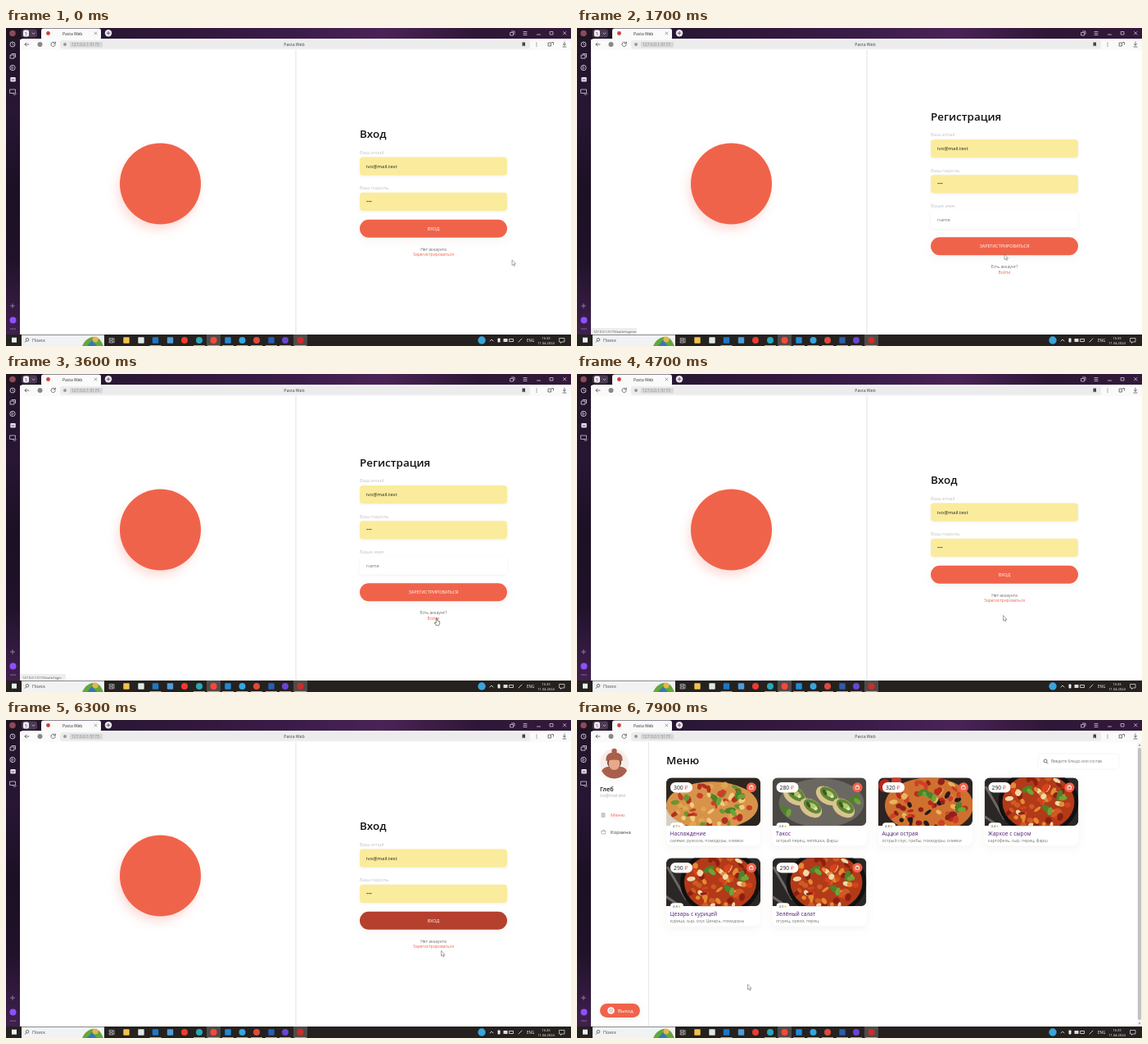
Write an HTML page that moves like this. It is 690x388 px and loops after 8000 ms.

```html
<!DOCTYPE html>
<html lang="ru">
<head>
<meta charset="utf-8">
<title>Pasta Web</title>
<style>
html, body { margin: 0; width: 100%; height: 100%; overflow: hidden; background: #fff; }
svg { display: block; width: 100%; height: 100%; }
text { font-family: 'Open Sans', 'Noto Sans', sans-serif; white-space: pre; }
</style>
</head>
<body>
<svg id="stage" viewBox="0 0 690 388"></svg>
<script>
const RED = '#f0634b', MAIL = 'ivo@mail.test', APP = 'Pasta Web';
const LOOP = 8000, STEP = 100;

// Markup helpers
const text = (x, y, size, fill, str, extra = '') =>
  `<text x="${x}" y="${y}" font-size="${size}" fill="${fill}" ${extra}>${str}</text>`;
const mid = 'text-anchor="middle"';
const box = (x, y, w, h, fill, r = 0, extra = '') =>
  `<rect x="${x}" y="${y}" width="${w}" height="${h}" rx="${r}" fill="${fill}" ${extra}/>`;
const dot = (x, y, r, fill, extra = '') => `<circle cx="${x}" cy="${y}" r="${r}" fill="${fill}" ${extra}/>`;
const oval = (x, y, rx, ry, fill, turn = 0) =>
  `<ellipse rx="${rx}" ry="${ry}" fill="${fill}" transform="translate(${x} ${y}) rotate(${turn})"/>`;
const line = (d, color, w = 0.8) =>
  `<path d="${d}" fill="none" stroke="${color}" stroke-width="${w}" stroke-linecap="round" stroke-linejoin="round"/>`;
const group = (id, body) => `<g id="${id}">${body}</g>`;

function defs() {
  const grad = (id, dir, ...stops) => `<linearGradient id="${id}" ${dir}>` + stops.map((c, i) =>
    `<stop offset="${i / (stops.length - 1)}" stop-color="${c}"/>`).join('') + '</linearGradient>';
  const shadow = (id, dx, dy, blur, color, alpha) =>
    `<filter id="${id}" x="-50%" y="-50%" width="200%" height="220%"><feDropShadow dx="${dx}" dy="${dy}"
      stdDeviation="${blur}" flood-color="${color}" flood-opacity="${alpha}"/></filter>`;
  return '<defs>' +
    grad('top', '', '#20141f', '#281733', '#32183c', '#3a1c48', '#4a2356', '#2e1736', '#33193b') +
    grad('side', 'x2="0" y2="1"', '#22152a', '#281634', '#1b1024', '#201229', '#40204f') +
    shadow('glow', -3, 7, 6, RED, 0.2) + shadow('soft', 0, 3, 5, '#a08c70', 0.1) +
    shadow('field', 0, 1, 1.4, '#8888aa', 0.13) +
    '<clipPath id="photo"><path d="M0 59V7a7 7 0 0 1 7-7H108a7 7 0 0 1 7 7V52a7 7 0 0 1-7 7z"/></clipPath></defs>';
}

function browser() {
  const white = '#e6dfe9', grey = '#555';
  const strip = box(0, 0, 690, 14, 'url(#top)') + box(0, 13, 17, 361, 'url(#side)') +
    dot(8, 6.5, 3.8, '#8a4a5c') + box(19, 1.5, 19, 10, '#4d3b56', 3) + box(21, 2.5, 7, 8, '#f4f0f5', 2) +
    text(24.5, 8.5, 5, '#333', '5', mid) + line('M32 6l1.5 1.5L35 6', white, 0.7) +
    box(43, 0.5, 73, 14, '#fafafa', 3) + dot(51.5, 6.5, 2.4, '#cf3f3a') + text(69, 8.5, 5, '#333', APP) +
    line('M108 5l3 3m0-3l-3 3', '#666', 0.6) +
    dot(125, 6.3, 4.2, '#efe8f2') + line('M123 6.3h4m-2-2v4', '#333', 0.7) +
    line('M616 5.500h3.500v3.500h-3.500zM617.500 4h3.500v3.500M632 4.500h4M632 6.500h4M632 8.500h4M648.500 8h4M664.500 4.500h3.500v3.500h-3.500zM680.500 4.500l3.500 3.500m0-3.500l-3.500 3.500', white, 0.7);
  const rail = dot(8, 20, 3, 'none', `stroke="${white}" stroke-width=".8"`) + line('M8 18v2l1.500 1', white, 0.6) +
    line('M5.500 33h4.500v4h-4.500zM7 31.500h4.500v4', white) +
    dot(8, 48.5, 3.2, 'none', `stroke="${white}" stroke-width=".8"`) + line('M7.300 47l2 1.500-2 1.500z', white, 0.6) +
    box(5.3, 60, 6.5, 5.5, white, 1) + line('M7 63h3', '#2a1634', 0.7) +
    line('M5 75h6.500v4.500h-6.500zM8.500 80l2 2 2-2', white, 0.7) +
    line('M5.500 339h5m-2.500-2.500v5', '#a58fb0') + dot(8.5, 356.5, 4, '#8d50ff') +
    [6, 8.5, 11].map(x => dot(x, 367, 0.6, white)).join('');
  const bar = '<path d="M17 27V17a4 4 0 0 1 4-4H690V27z" fill="#fafafa"/>' +
    box(66, 15, 574, 10.5, '#ececed', 3) +
    line('M28 20h-5m2-2l-2 2 2 2', grey) + dot(41.5, 20, 3, '#888') +
    line('M60 18.500a2.700 2.700 0 1 0 .3 2M60.300 17v2h-2', grey) +
    dot(72, 20, 2, '#999') + box(78, 17, 40, 6.5, '#d8d8da', 1) +
    text(80, 22, 5, '#8b8b8d', '127.0.0.1:5173') + text(352, 22, 5.2, '#444', APP, mid) +
    '<path d="M630.500 17.500h3.500v5l-1.750-1.300-1.750 1.300z" fill="#444"/>' +
    [18, 20, 22].map(y => dot(648, y, 0.6, grey)).join('') +
    line('M662.500 18h3v4h-3zM666.500 17.500h2v2.500M682 17v4m-1.700-1.500l1.700 1.700 1.700-1.700M680 23h4', grey);
  return strip + box(17, 27, 673, 347, '#fff') + bar + rail;
}

function taskbar() {
  const icons = [[147, '#f2c24b'], [165, '#dfe8e4'], [182.5, '#1b78c8'], [200.5, '#4f9bd8'], [218, '#ef3a2d', 1],
    [236, '#2aa6b8', 1], [253.5, '#f5483a', 1], [271, '#2489d6'], [288.5, '#35a6de', 1], [306, '#e04a3a', 1],
    [324, '#2a5db0'], [341, '#6a45d4', 1], [359.5, '#c92f2a', 1]];
  const marks = icons.map(([x, c, round], i) =>
    (i == 6 || i == 12 ? box(x - 8.5, 374, 17, 14, '#504b4a') : '') +
    (round ? dot(x, 381, 4, c) : box(x - 3.7, 377.3, 7.4, 7.4, c, 0.8)) +
    (i > 4 || i == 2 ? box(x - 7, 387, 14, 1, '#7fb7e6') : '')).join('');
  return box(0, 374, 690, 14, '#24211f') + box(10 - 3, 377.7, 6, 6, '#e9eef2') +
    box(19, 374.5, 101, 13.5, '#f1f2f3') + dot(26, 380.3, 1.8, 'none', 'stroke="#444" stroke-width=".7"') +
    line('M24.700 381.700l-1.500 1.700', '#444', 0.7) + text(32, 383, 5.4, '#444', 'Поиск') +
    '<path d="M93 388q4-9 12-11 9-2 14 11z" fill="#62a83d"/>' + dot(109, 380, 3.5, '#e6b64c') +
    '<path d="M99 388l6-7 6 7z" fill="#3479b6"/>' +
    line('M126.500 378.500h4v2h-4zM126.500 382h4v2h-4zM132 378.500v5.500', '#ddd', 0.7) + marks +
    dot(581, 381, 4.7, '#3aa4dc') + line('M591 382l2-2 2 2', '#eee') + box(600.5, 378.5, 3, 5, '#eee', 0.8) +
    box(607.5, 379, 5, 4, '#ddd', 0.5) + line('M615 382.500h4.500v-3h-4.500zM626 383l4-4', '#eee') +
    text(636, 383, 4.5, '#fff', 'ENG') + text(659.5, 379.7, 4, '#fff', '16:33', mid) +
    text(659.5, 386.3, 4, '#fff', '11.04.2024', mid) + line('M676 378.500h6v4.500h-3l-1.500 1.500v-1.500h-1.500z', '#eee', 0.7);
}

function form(top, title, named, action, ask, link, id) {
  const field = (y, label, value, fill, ink) => text(432, y - 3.8, 6, '#c2c2c6', label) +
    box(432, y, 180, 22.2, fill, 4, 'filter="url(#field)"') + text(440, y + 13, 6, ink, value);
  const end = top + (named ? 147.8 : 104.8);
  return text(432, top + 5, 13.4, '#111', title, 'font-weight="600"') +
    field(top + 28.6, 'Ваш email', MAIL, '#faec9c', '#222') +
    field(top + 71.8, 'Ваш пароль', '•••', '#faec9c', '#111') +
    (named ? field(top + 115, 'Ваше имя', 'name', '#fff', '#777') : '') +
    box(432, end, 180, 22, RED, 11, `id="${id}" filter="url(#soft)"`) +
    text(522, end + 13, 5.4, '#fff', action, mid) +
    text(522, end + 37.9, 5, '#666', ask, mid) + text(522, end + 44.5, 5, RED, link, mid);
}

// Food pictures: table colour, dish colour, dish [x, y, rx, ry], colours of the bits, leaf spots
const LEAF = '#4f8128';
const foods = {
  pizza: ['#2b2520', '#d8934a', [56, 34, 56, 29], ['#c8402a', '#6d9430', '#efcd7c', '#b0301f', '#e0a650'],
    [[12, 12], [60, 26], [88, 20], [78, 40]]],
  taco: ['#4a4641', '#6b6861', [60, 31, 52, 30], [], [[100, 26], [16, 40]]],
  hot: ['#2c2422', '#d0702f', [62, 34, 54, 34], ['#b82a1e', '#e9b45c', '#231b1c', '#cf3f28', '#8f2118'],
    [[54, 18], [64, 22], [98, 36]]],
  stew: ['#2b2727', '#b23a18', [66, 30, 44, 35], ['#d4431c', '#f2d8a8', '#e58a32', '#8c1f10', '#cf5a22'],
    [[52, 14], [76, 38], [92, 22]]]
};
function photo(kind) {
  const [table, base, [x, y, rx, ry], bits, leaves] = foods[kind];
  let seed = 11;
  const rnd = () => (seed = seed * 16807 % 2147483647) / 2147483647;
  let art = box(0, 0, 115, 59, table);
  if (kind == 'stew') art += line('M2 12L24 50M-2 46L16 58', '#6d6763', 3) + oval(x, y, rx + 5, ry + 5, '#121010');
  if (kind == 'pizza') art += '<path d="M0 59V38l14 5 10 16z" fill="#d8cfc4"/>';
  if (kind == 'hot') art += dot(8, 10, 8, '#b5271d') + dot(22, 4, 6, '#cf3a28');
  art += oval(x, y, rx, ry, base);
  for (let i = 0; i < bits.length * 14; i++) {
    const a = rnd() * 6.283, d = Math.sqrt(rnd()) * 0.92;
    art += oval((x + Math.cos(a) * d * rx).toFixed(1), (y + Math.sin(a) * d * ry).toFixed(1),
      (2.2 + rnd() * 3).toFixed(1), (1.6 + rnd() * 2.4).toFixed(1), bits[i % bits.length], Math.round(rnd() * 180));
  }
  if (kind == 'taco') for (let i = 0; i < 4; i++) {
    const tx = 27 + i * 20, ty = 22 + i % 2 * 15;
    art += oval(tx, ty, 15, 10, '#d9c48c', 35) + oval(tx + 2, ty - 2, 12, 7, '#5f8734', 35) +
      oval(tx + 3, ty - 2, 6, 3, '#b3c76c', 35) + oval(tx - 3, ty - 4, 4, 2, '#3e5a22', 60) + dot(tx + 6, ty + 1, 2, '#e8e0c4');
  }
  return art + leaves.map(([lx, ly], i) =>
    oval(lx, ly, 7, 3.6, LEAF, i * 65 - 25) + oval(lx + 4, ly + 3, 5, 2.8, '#6fa337', i * 65 + 40)).join('');
}

function card([name, price, rate, about, kind], i) {
  const bag = line('M102 10.500h4v3.500h-4zM103 10.500v-1h2v1', '#fff', 0.8);
  return `<g transform="translate(${109 + i % 4 * 129.5} ${70.3 + (i >> 2) * 98})">` +
    box(0, 0, 115, 83, '#fff', 7, 'filter="url(#soft)"') + `<g clip-path="url(#photo)">${photo(kind)}</g>` +
    box(5, 5.7, 27, 12.5, '#fff', 6.25) + text(9, 14.3, 6.8, '#222', `${price} <tspan fill="${RED}">₽</tspan>`) +
    dot(104, 12, 6, RED) + bag + box(5, 55, 16, 8, '#fff', 4) +
    text(8, 60.8, 4.2, '#444', `${rate}<tspan fill="#f2b632">★</tspan>`) +
    text(4.5, 70.5, 6.7, '#4d1c74', name, 'font-weight="500"') + text(4.5, 78.3, 5.1, '#777', about) + '</g>';
}

function menu() {
  const cards = [
    ['Наслаждение', 300, 4.7, 'салями, руккола, помидоры, оливки', 'pizza'],
    ['Такос', 280, 4.8, 'острый перец, лепёшка, фарш', 'taco'],
    ['Аццки острая', 320, 4.8, 'острый соус, грибы, помидоры, оливки', 'hot'],
    ['Жаркое с сыром', 290, 4.4, 'картофель, сыр, перец, фарш', 'stew'],
    ['Цезарь с курицей', 290, 4.8, 'курица, сыр, соус Цезарь, помидоры', 'stew'],
    ['Зелёный салат', 290, 4.5, 'огурец, орехи, перец', 'stew']];
  const avatar = dot(45.5, 53, 17.5, '#f6eee8', 'filter="url(#soft)"') +
    '<path d="M30 62q3-5 9-5h13q7 0 9 5a17.500 17.500 0 0 1-31 0z" fill="#a8604c"/>' +
    oval(45.5, 52, 8.5, 8, '#5d372e') + oval(45.5, 53, 7, 8, '#e7a98a') + dot(45.5, 38, 3.2, '#a9604a') +
    '<path d="M35.500 50q-1-10.500 10-10.500t10 10.500q-10-3-20 0z" fill="#a9604a"/>';
  return avatar + text(28, 86.5, 7.3, '#111', 'Глеб', 'font-weight="600"') + text(28, 94, 5, '#aaa', MAIL) +
    box(29.5, 113, 5, 6, '#c9c9cd', 0.8) + text(41, 118, 6, RED, 'Меню') +
    line('M30 135.500h5l-.6 3.500h-3.800zM31 135.500l1.500-2 1.500 2', '#aaa') + text(41, 139, 6, '#333', 'Корзина') +
    box(28, 346, 49, 17, RED, 8.5, 'filter="url(#soft)"') + dot(41.5, 354.5, 4.3, '#fff') +
    dot(41.5, 354.5, 1.8, 'none', `stroke="${RED}" stroke-width=".8"`) + text(50, 356.8, 6, '#fff', 'Выход') +
    box(87, 27, 1, 347, '#e7e7e9') + text(109, 54, 13.4, '#111', 'Меню', 'font-weight="600"') +
    box(563, 41, 99, 19, '#fff', 5, 'stroke="#f3f2f3" stroke-width=".8"') +
    dot(572, 50, 2, 'none', 'stroke="#555" stroke-width=".8"') + line('M573.500 51.500l1.500 1.500', '#555') +
    text(579, 52.3, 4.8, '#777', 'Введите блюдо или состав') + cards.map(card).join('') +
    box(684, 27, 6, 347, '#f4f4f5') + box(685, 34, 4, 332, '#c2c2c5', 2) +
    '<path d="M685.500 31.500l1.500-2 1.500 2zM685.500 369.500l1.500 2 1.500-2z" fill="#888"/>';
}

const auth = dot(188.5, 190, 49.5, RED, 'filter="url(#glow)"') + box(353.5, 27, 1, 347, '#e2e2e4');
const pointers =
  group('arrow', '<path d="M0 0v6.500l1.500-1.300 1 2.300 1-.4-1-2.200h2z" fill="#fff" stroke="#555" stroke-width=".5"/>') +
  group('beam', line('M-1-3.500h2M0-3.500v7M-1 3.500h2', '#333', 0.7)) +
  group('hand', '<path d="M-.8 0h1.400v3l3 .7v3l-1 2h-3.400l-2-3 .6-.7 1.400 1z" fill="#fff" stroke="#333" stroke-width=".6"/>');

const $ = id => document.getElementById(id);
$('stage').innerHTML = defs() + browser() + group('auth', auth) +
  group('login', form(129, 'Вход', false, 'ВХОД', 'Нет аккаунта', 'Зарегистрироваться', 'enter')) +
  group('join', form(107.5, 'Регистрация', true, 'ЗАРЕГИСТРИРОВАТЬСЯ', 'Есть аккаунт?', 'Войти', 'create')) +
  group('menu', menu()) +
  group('status', box(17, 366, 56, 8, '#eeeeef', 1) + text(20, 371.5, 4, '#555', '', 'id="url"')) +
  taskbar() + group('cursor', pointers);

// Keys are [time, ...values]
const path = [[0, 618, 283], [100, 618, 283], [500, 575, 250], [900, 522, 272], [1000, 522, 272], [1300, 522, 276],
  [1700, 522, 276], [2300, 474, 360], [2900, 474, 360], [3600, 526, 298], [3900, 526, 298], [4300, 520.5, 294.5],
  [4700, 520.5, 294.5], [4950, 522, 331], [5350, 525, 245], [6000, 525, 245], [6300, 531.5, 281.5], [6700, 529, 296],
  [6800, 529, 296], [7100, 514, 360], [7300, 497, 318], [7400, 497, 318], [7900, 208.5, 322.5]];
const hover = [[0, 0], [400, 0], [700, 0.4], [1000, 0.14], [1300, 0], [5100, 0], [5400, 1], [8000, 1]];

function at(keys, t) {
  const i = keys.findIndex(k => k[0] > t);
  if (i < 0) return keys.at(-1).slice(1);
  const a = keys[i - 1], b = keys[i], u = (t - a[0]) / (b[0] - a[0]), e = u * u * (3 - 2 * u);
  return a.slice(1).map((v, j) => v + (b[j + 1] - v) * e);
}
const show = (id, on) => $(id).style.display = on ? '' : 'none';
const within = (v, a, b) => v >= a && v < b;

function draw(now) {
  const t = Math.floor(now % LOOP / STEP) * STEP;
  const scene = t >= 6500 ? 'menu' : within(t, 1600, 3900) ? 'join' : 'login';
  ['login', 'join', 'menu'].forEach(s => show(s, s == scene));
  show('auth', scene != 'menu');

  const [x, y] = at(path, t), [h] = at(hover, t);
  const link = scene == 'login' ? within(x, 497, 548) && within(y, 273.5, 281) || within(x, 432, 612) && within(y, 234, 256)
    : scene == 'join' && within(x, 512, 531) && within(y, 295, 302);
  const kind = link ? 'hand' : scene == 'login' && within(x, 506, 538) && within(y, 267, 273.5) ? 'beam' : 'arrow';
  ['arrow', 'beam', 'hand'].forEach(k => show(k, k == kind));
  $('cursor').setAttribute('transform', `translate(${x} ${y})`);

  const mix = (a, b) => Math.round(a + (b - a) * h);
  $('enter').setAttribute('fill', `rgb(${mix(240, 181)},${mix(99, 64)},${mix(75, 47)})`);
  show('status', within(t, 1500, 2000) || within(t, 3500, 4100));
  $('url').textContent = '127.0.0.1:5173/auth/' + (t < 3000 ? 'register' : 'login');
  requestAnimationFrame(draw);
}
requestAnimationFrame(draw);
</script>
</body>
</html>
```
